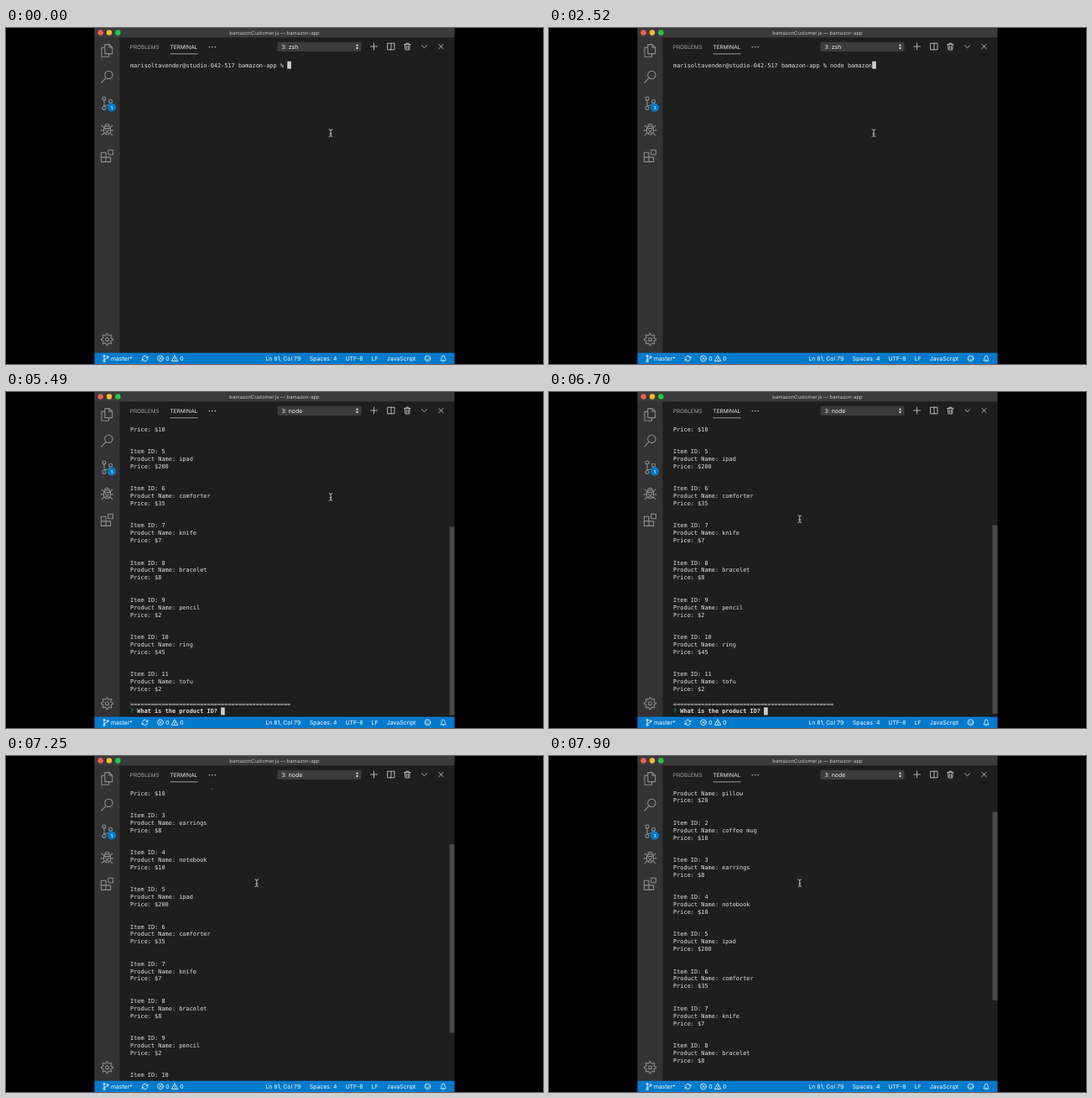
An HTML page for the animation above (8000 ms loop, 640x400 px).

```html
<!DOCTYPE html>
<html lang="en">
<head>
<meta charset="utf-8">
<title>Terminal session</title>
<style>
  html, body { margin: 0; width: 100%; height: 100%; overflow: hidden; background: #000; }
  svg { display: block; width: 640px; height: 400px; }
  text { white-space: pre; text-rendering: geometricPrecision; }
  .ui { font-family: Inter, sans-serif; }
  .mono { font: 6.915px "DejaVu Sans Mono", monospace; fill: #e0e0e0; }
  .line { fill: none; stroke-linecap: round; stroke-linejoin: round; }
</style>
</head>
<body>
<svg viewBox="0 0 640 400">
  <defs><clipPath id="view"><rect x="136" y="39.3" width="392" height="46" id="viewBox"/></clipPath></defs>
  <rect width="640" height="400"/>
  <rect x="105.5" width="429" height="400" fill="#1e1e1e"/>
  <rect x="105.5" y="11" width="30" height="376" fill="#333"/>
  <rect x="105.5" width="429" height="11.3" fill="#3b3b3c"/>
  <rect x="105.5" y="386.7" width="429" height="13.3" fill="#007acc"/>

  <!-- title bar -->
  <circle cx="112.6" cy="5.5" r="3.2" fill="#fc5b57"/>
  <circle cx="123" cy="5.5" r="3.2" fill="#fdbc2e"/>
  <circle cx="133.4" cy="5.5" r="3.2" fill="#28c840"/>
  <text class="ui" x="320" y="7.8" font-size="5.95" fill="#c8c8c8" text-anchor="middle">bamazonCustomer.js — bamazon-app</text>

  <!-- panel header -->
  <g class="ui" font-size="6.45">
    <text x="147.8" y="24.8" fill="#a0a0a0">PROBLEMS</text>
    <text x="195.6" y="24.8" fill="#e7e7e7">TERMINAL</text>
  </g>
  <rect x="195.6" y="30.5" width="33" height=".7" fill="#c8c8c8"/>
  <g fill="#c0c0c0"><circle cx="242.4" cy="22.6" r=".8"/><circle cx="245.8" cy="22.6" r=".8"/><circle cx="249.2" cy="22.6" r=".8"/></g>
  <rect x="323.5" y="16.8" width="100" height="11.2" rx="1.5" fill="#3c3c3c"/>
  <text class="ui" x="328.6" y="24.9" font-size="6.9" fill="#f0f0f0" id="shell">3: zsh</text>
  <path d="M416.8 21.5l1.7-2.3 1.7 2.3zM416.8 23.2l1.7 2.3 1.7-2.3z" fill="#eee"/>
  <g class="line" stroke="#c5c5c5" stroke-width=".9">
    <path d="M434.5 22h8M438.5 18v8"/>
    <path d="M455 18.2h8v7.6h-8zM459 18.2v7.6"/>
    <path d="M474.6 19.4h7.4M476.9 19.4v-1.3h2.8v1.3M475.5 19.6l.4 6.4h4.8l.4-6.4M477.3 21.2v3.2M479.3 21.2v3.2"/>
    <path d="M495.5 20.7l3 3 3-3"/>
    <path d="M515.9 19.5l5.2 5.2M521.1 19.5l-5.2 5.2"/>
  </g>

  <!-- activity bar -->
  <g class="line" stroke="#8c8c8c" stroke-width="1.1">
    <path d="M117.8 19.6h5.4l3.4 3.4v7.6h-8.8zM123 19.8v3.4h3.4M117.6 23.4h-3.6v10.9h8.6v-3.5"/>
    <circle cx="122.4" cy="55.9" r="4.7"/><path d="M119 59.4l-5.2 5.8"/>
    <circle cx="117" cy="84" r="2"/><circle cx="117" cy="95.2" r="2"/><circle cx="124.6" cy="87.2" r="2"/>
    <path d="M117 86v7.2M124.6 89.2q-.4 2.6-3.6 2.8-3 .2-4 1.4"/>
    <ellipse cx="120.5" cy="121.8" rx="4.1" ry="5.2"/>
    <path d="M117.7 117.6q0-3.3 2.8-3.3t2.8 3.3M116.6 119.6h7.8M116.4 121.9h-3.2M124.6 121.9h3.2M117 118.8l-2.9-2.6M124 118.8l2.9-2.6M117 125l-2.8 2.6M124 125l2.8 2.6M118.6 121.6l3.8 3.8M122.4 121.6l-3.8 3.8"/>
    <path d="M113.4 148.3h5.6v5.6h5.6v5.5h-11.2zM113.4 153.9h5.6v5.5M121.8 145.2h5.6v5.6h-5.6z"/>
    <path id="gear"/><circle cx="120.5" cy="370.7" r="2"/>
  </g>
  <circle cx="126" cy="94.6" r="5" fill="#007acc"/>
  <text class="ui" x="125.9" y="96.6" font-size="5.4" font-weight="600" fill="#fff" text-anchor="middle">1</text>

  <!-- status bar -->
  <g class="ui" font-size="6.9" fill="#fff">
    <text x="124.9" y="395.9">master*</text>
    <text x="190.2" y="395.9">0</text>
    <text x="207.3" y="395.9">0</text>
    <text x="309.4" y="395.9">Ln 81, Col 79</text>
    <text x="361.8" y="395.9">Spaces: 4</text>
    <text x="404.4" y="395.9">UTF-8</text>
    <text x="435.6" y="395.9">LF</text>
    <text x="453.8" y="395.9">JavaScript</text>
  </g>
  <g class="line" stroke="#fff" stroke-width=".75">
    <circle cx="117" cy="390.5" r="1.1"/><circle cx="117" cy="396.6" r="1.1"/><circle cx="121" cy="391.7" r="1.1"/>
    <path d="M117 391.6v3.9M121 392.8q-.2 1.5-4 1.8"/>
    <path d="M162.4 393a3.2 3.2 0 0 1 6-1M168.6 394a3.2 3.2 0 0 1-6 1M167 392.6h2v-1.6M164 394.4h-2v1.6"/>
    <circle cx="184" cy="393.4" r="3.4"/><path d="M182.7 392.1l2.6 2.6M185.3 392.1l-2.6 2.6"/>
    <path d="M201.2 390.1l3.6 6.4h-7.2zM201.2 392.3v2M201.2 395.4v.1"/>
    <circle cx="502.5" cy="393.4" r="3.4"/><path d="M500.8 394.4q1.7 2 3.4 0M501.2 392.3v.1M503.8 392.3v.1"/>
    <path d="M518.2 395.6q1-.8 1-3.2 0-2.3 1.9-2.3t1.9 2.3q0 2.4 1 3.2zM520.3 396.8q.8.6 1.6 0"/>
  </g>

  <!-- terminal -->
  <g clip-path="url(#view)">
    <text class="mono" x="148" y="46.5" id="prompt"></text>
    <g class="mono" id="output"></g>
    <rect width="4.6" height="9" fill="#cfcfcf" id="cursor"/>
  </g>
  <rect x="528.6" width="5.9" height="224.5" fill="#484848" id="bar"/>
  <path class="line" d="M-1.9-4.2q1.9 0 1.9 1v6.4q0 1-1.9 1M1.9-4.2q-1.9 0-1.9 1M0 3.2q0 1 1.9 1M-1 .8h2" stroke="#d0d0d0" stroke-width=".9" id="mouse"/>
</svg>
<script>
const $ = id => document.getElementById(id);
const LOOP = 8000, LEFT = 148, BASE = 46.5, CHAR = 4.163, ROW = 8.84;
const PROMPT = 'marisoltavender@studio-042-517 bamazon-app % ';
const COMMAND = 'node bamazonCustomer.js ';
const ENTER = 5020, RENAME = 5170, PRINT = 5490;

// [time, value...] steps; each holds until the next
const typed = [[0, 0], [720, 1], [870, 2], [1030, 3], [1150, 4], [1270, 5], [1680, 6],
  [1820, 8], [1990, 9], [2270, 10], [2400, 11], [2520, 12], [2970, 13], [3270, 14],
  [3390, 15], [3990, 24]];
const pointer = [[0, 387, 125], [6040, 340.3, 91.7], [6200, 324, 77], [6330, 304, 112], [6450, 298.8, 151.2]];
const scrolled = [[0, 0], [6700, .3], [6870, 2.9], [7010, 5.57], [7130, 7.8], [7250, 9.6],
  [7400, 11.4], [7600, 13.3], [7770, 15], [7900, 16.3]];
const at = (steps, t) => steps.findLast(s => s[0] <= t).slice(1);

const items = [['pillow', 20], ['coffee mug', 10], ['earrings', 8], ['notebook', 10], ['ipad', 200],
  ['comforter', 35], ['knife', 7], ['bracelet', 8], ['pencil', 2], ['ring', 45], ['tofu', 2]];

function print(row, str, col = 0, style = '') {
  const el = document.createElementNS('http://www.w3.org/2000/svg', 'text');
  el.setAttribute('x', LEFT + col * CHAR);
  el.setAttribute('y', BASE + row * ROW);
  el.setAttribute('style', style);
  el.textContent = str;
  $('output').append(el);
}

items.forEach(([name, price], i) => {
  const row = 5 * i - 17;
  print(row, `Item ID: ${i + 1}`);
  print(row + 1, `Product Name: ${name}`);
  print(row + 2, `Price: $${price}`);
});
print(37, '='.repeat(46));
print(38, '?', 0, 'fill:#0dbc79');
print(38, 'What is the product ID?', 2, 'font-weight:bold');

function gearPath(cx, cy, teeth) {
  const pts = [];
  for (let i = 0; i < teeth * 4; i++) {
    const a = (i - .5) * Math.PI / (teeth * 2), r = i % 4 < 2 ? 7 : 5;
    pts.push((cx + r * Math.sin(a)).toFixed(2) + ' ' + (cy - r * Math.cos(a)).toFixed(2));
  }
  return 'M' + pts.join('L') + 'z';
}
$('gear').setAttribute('d', gearPath(120.5, 370.7, 8));
$('viewBox').setAttribute('height', 346);

const show = (id, on) => $(id).setAttribute('visibility', on ? 'visible' : 'hidden');
const move = (id, x, y) => $(id).setAttribute('transform', `translate(${x} ${y})`);

function draw(t) {
  const [count] = at(typed, t), [scroll] = at(scrolled, t);
  const printed = t >= PRINT, shift = Math.round(scroll);
  $('prompt').textContent = PROMPT + COMMAND.slice(0, count);
  $('shell').textContent = t < RENAME ? '3: zsh' : '3: node';
  show('prompt', !printed);
  show('output', printed);
  show('bar', printed);
  move('output', 0, shift * ROW);
  move('bar', 0, 160.2 - scroll * 5.75);
  move('mouse', ...at(pointer, t));
  const [col, row] = printed ? [26, 38 + shift] : t >= ENTER ? [0, 1] : [PROMPT.length + count, 0];
  move('cursor', LEFT + col * CHAR - .1, 39.6 + row * ROW);
}

const start = performance.now();
function tick() {
  draw((performance.now() - start) % LOOP);
  requestAnimationFrame(tick);
}
tick();
</script>
</body>
</html>
```
